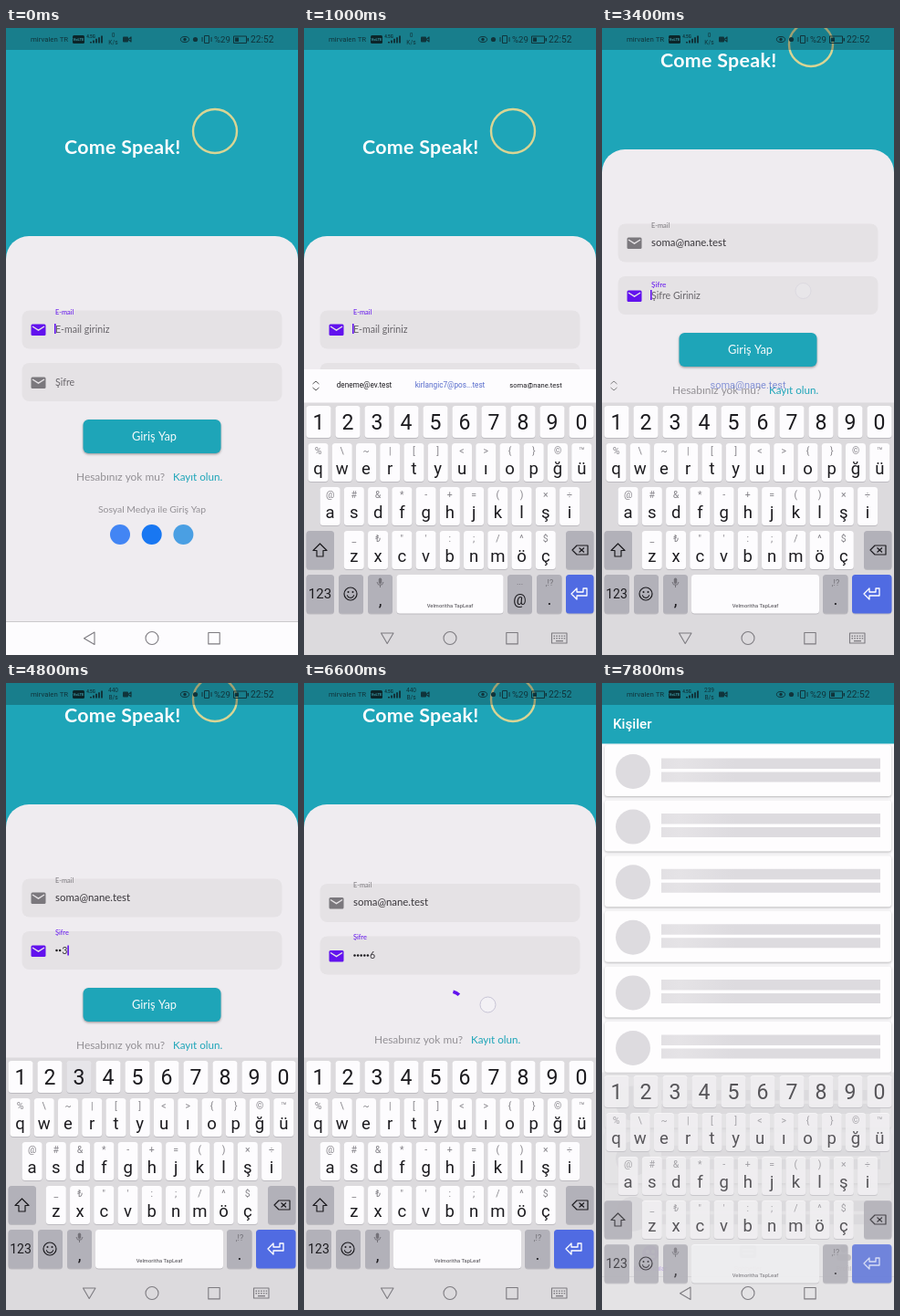
An HTML page with a canvas that plays this animation: 320x687 px, repeating every 8 s.

```html
<!DOCTYPE html>
<html lang="tr">
<head>
<meta charset="utf-8">
<title>Giriş</title>
<style>
html, body { margin: 0; width: 100%; height: 100%; overflow: hidden; background: #efecf0; }
canvas { display: block; width: 320px; height: 687px; }
</style>
</head>
<body>
<canvas id="stage"></canvas>
<script>
const W = 320, H = 687, LOOP = 8000, STEP = 200;
const TEAL = '#1ea5b8', PURPLE = '#6212ee', PAGE = '#efecf0', FIELD = '#e5e2e5', GREY = '#7b787d', INK = '#1c1b1f';
const MAIL = 'soma@nane.test';
const LATO = 'Lato, sans-serif', ROBOTO = 'Roboto, sans-serif';
const cv = document.getElementById('stage'), c = cv.getContext('2d');
const dpr = window.devicePixelRatio || 1;
cv.width = W * dpr;
cv.height = H * dpr;

const clamp = v => Math.max(0, Math.min(1, v));
const ramp = (t, a, b) => clamp((t - a) / (b - a));
const ease = p => p < .5 ? 4 * p ** 3 : 1 - (2 - 2 * p) ** 3 / 2;
const easeOut = p => 1 - (1 - p) ** 3;

function text(s, x, y, size, color, { align = 'left', font = LATO, weight = 400, gap = 0 } = {}) {
  c.font = `${weight} ${size}px ${font}`;
  c.letterSpacing = gap + 'px';
  c.textAlign = align;
  c.textBaseline = 'middle';
  c.fillStyle = color;
  c.fillText(s, x, y);
  return c.measureText(s).width;
}
const mid = (s, x, y, size, color, weight = 400, font = ROBOTO) =>
  text(s, x, y, size, color, { align: 'center', font, weight });

function box(x, y, w, h, r, color) {
  c.fillStyle = color;
  c.beginPath();
  c.roundRect(x, y, w, h, r);
  c.fill();
}
function disc(x, y, r, color) {
  c.fillStyle = color;
  c.beginPath();
  c.arc(x, y, r, 0, 7);
  c.fill();
}
function ring(x, y, r, color, width = 1) {
  c.strokeStyle = color;
  c.lineWidth = width;
  c.beginPath();
  c.arc(x, y, r, 0, 7);
  c.stroke();
}
function line(points, color, width = 1, close = false) {
  c.strokeStyle = color;
  c.lineWidth = width;
  c.lineJoin = 'round';
  c.beginPath();
  for (let i = 0; i < points.length; i += 2) c.lineTo(points[i], points[i + 1]);
  if (close) c.closePath();
  c.stroke();
}
function layer(alpha, dy, draw) {
  if (alpha <= 0) return;
  c.save();
  c.globalAlpha *= alpha;
  c.translate(0, dy);
  draw();
  c.restore();
}
function shadow(color, blur, dy, draw) {
  c.save();
  c.shadowColor = color;
  c.shadowBlur = blur * dpr;
  c.shadowOffsetY = dy * dpr;
  draw();
  c.restore();
}

// Status bar
function statusBar(t) {
  box(0, 0, W, 24, 0, 'rgba(10,20,25,.27)');
  const ink = '#10343b';
  text('mirvalen TR', 27, 12.5, 7.8, ink, { font: ROBOTO });
  box(73, 8, 13, 9, 1.5, '#0c2529');
  mid('VoLTE', 79.5, 12.8, 4.2, '#3d96a2', 700);
  mid('4.5G', 93, 9.5, 4.6, ink, 700);
  for (let i = 0; i < 5; i++) box(92 + i * 3, 15 - i * 1.6, 2, 1.5 + i * 1.6, 0, ink);
  const [rate, unit] = t < 4600 ? ['0', 'K/s'] : t < 7000 ? ['440', 'B/s'] : ['239', 'B/s'];
  mid(rate, 117.5, 8.5, 6.6, ink);
  mid(unit, 117.5, 16.5, 6.6, ink);
  box(128, 9.5, 6, 6, 1, ink);
  line([134, 12.5, 137, 10, 137, 15, 134, 12.5], ink, 1.2);
  c.strokeStyle = ink;
  c.lineWidth = 1;
  c.beginPath();
  c.ellipse(196, 12.5, 4.6, 3, 0, 0, 7);
  c.stroke();
  disc(196, 12.5, 1.7, ink);
  disc(207.5, 12.5, 2.6, ink);
  c.strokeRect(217.5, 8.5, 5, 8);
  line([215, 10, 215, 15], ink);
  line([225, 10, 225, 15], ink);
  text('%29', 228, 12.8, 9.6, ink, { font: ROBOTO });
  c.strokeStyle = ink;
  c.strokeRect(249.5, 9, 14, 7.5);
  box(251, 10.5, 4, 4.5, 0, ink);
  box(264.5, 11, 1.5, 3.5, 0, ink);
  text('22:52', 268, 12.8, 10.2, ink, { font: ROBOTO });
}

// Login page
function envelope(x, y, color) {
  box(x - 8, y - 6, 16, 12.5, 1.5, color);
  line([x - 6.5, y - 3.5, x, y + .7, x + 6.5, y - 3.5], FIELD, 1.4);
}
function caret(x, y) { box(x, y - 5.5, 1.6, 11, 0, PURPLE); }

function emailField(t) {
  const active = t < 3200, filled = t >= 1800;
  box(17.5, 309.5, 285, 42, 8, FIELD);
  envelope(35.5, 330.5, active ? PURPLE : GREY);
  text('E-mail', 54, 311.5, 7.4, active ? PURPLE : GREY);
  if (!filled) {
    text('E-mail giriniz', 54, 330.5, 10.6, '#68656a');
    caret(53, 329.5);
    return;
  }
  const w = text(MAIL, 54, 330.5, 11.4, '#39363b');
  if (active) {
    box(54, 335.5, w, .8, 0, '#39363b');
    caret(54.5 + w, 329.5);
  }
}

const TYPED = [4100, 4400, 4700, 5100, 5400, 5700];
function passwordField(t) {
  const active = t >= 3200, n = TYPED.filter(a => t >= a).length;
  box(17.5, 367, 285, 42, 8, FIELD);
  envelope(35.5, 388.5, active ? PURPLE : GREY);
  if (!active) {
    text('Şifre', 54, 388.5, 10.6, '#68656a');
    return;
  }
  const up = ramp(t, 3200, 3520);
  text('Şifre', 54, 388.5 - 20 * up, 9.6 - 2.2 * up, PURPLE);
  if (!n) {
    text('Şifre Giriniz', 54, 388.5, 10.6, '#68656a');
    caret(53, 387.5);
    return;
  }
  const plain = t - TYPED[n - 1] < 1500, dots = plain ? n - 1 : n;
  for (let i = 0; i < dots; i++) disc(55.5 + i * 3.6, 388, 1.25, INK);
  let x = 54 + dots * 3.6;
  if (plain) x += text(n, x, 388.5, 10.6, '#39363b');
  if (t < 6400) caret(x, 388);
}

function spinner(t) {
  const dt = t - 6400, cyc = dt % 1333 / 1333, deg = Math.PI / 180;
  const head = 270 * ease(clamp(cyc * 2)), tail = 270 * ease(clamp(cyc * 2 - 1));
  const base = dt * .07 + 270 * Math.floor(dt / 1333) - 90;
  c.strokeStyle = PURPLE;
  c.lineWidth = 3.6;
  c.beginPath();
  c.arc(160, 447, 14.2, (base + tail) * deg, (base + head + 1) * deg);
  c.stroke();
}

function loginPage(t) {
  const busy = t >= 6400, squeeze = busy ? 5.5 : 0;
  const scroll = -95 * easeOut(ramp(t, 2620, 3100));
  box(0, 0, W, H, 0, TEAL);
  layer(1, scroll, () => {
    text('Come Speak!', 64, 131, 21.4, '#fbfcfd', { weight: 700, gap: .3 });
    ring(229, 113, 24, '#d9d594', 2.4);
    box(0, 228, W, 700, [25, 25, 0, 0], PAGE);
    layer(1, squeeze, () => { emailField(t); passwordField(t); });
    if (busy) spinner(t);
    else {
      shadow('rgba(0,0,0,.35)', 2.5, 1.2, () => box(84.5, 429, 151, 37, 6, TEAL));
      mid('Giriş Yap', 162.5, 448, 12.8, '#f4fafb', 400, LATO);
    }
    layer(1, -squeeze, () => {
      text('Hesabınız yok mu?', 77, 492, 11.9, '#939095');
      text('Kayıt olun.', 183, 492, 11.6, TEAL);
      mid('Sosyal Medya ile Giriş Yap', 160, 528, 10.4, '#939095', 400, LATO);
      ['#4285f4', '#1877f2', '#4a9fe3'].forEach((col, i) => disc(125 + i * 34.7, 555, 11, col));
    });
  });
}

// Contacts page
function contactsPage(t) {
  box(0, 0, W, H, 0, '#faf9fb');
  const x = 85 + (t - 7800) * .5;
  const glow = c.createLinearGradient(x - 60, 0, x + 60, 0);
  glow.addColorStop(0, '#dddbdf');
  glow.addColorStop(.5, '#e5e3e6');
  glow.addColorStop(1, '#dddbdf');
  for (let i = 0; i < 9; i++) {
    const y = 68 + i * 60.6;
    shadow('rgba(0,0,0,.28)', 2.5, 1, () => box(3, y, 314, 56, 3, '#fefdfe'));
    disc(34, y + 29, 19, '#dddbdf');
    box(65, y + 14.5, 240, 11.5, 0, glow);
    box(65, y + 29.5, 240, 11, 0, glow);
  }
  box(0, 24, W, 42.5, 0, TEAL);
  box(0, 0, W, 24, 0, TEAL);
  text('Kişiler', 12, 46, 15.2, '#fff', { font: ROBOTO, weight: 500 });
  box(0, 601, W, 50, 0, '#fdfcfe');
  disc(53, 625, 9, PURPLE);
  disc(50, 623, 2, '#fff');
  disc(56, 623, 2, '#fff');
  box(48, 627, 10, 3, 2, '#fff');
  box(151, 616, 18, 14, 2, GREY);
  line([154, 621, 166, 621], '#fff');
  line([154, 625, 166, 625], '#fff');
  disc(265, 620, 4, GREY);
  box(257, 626, 16, 7, 4, GREY);
  mid('Kullanıcılar', 53, 642, 7.6, PURPLE);
  mid('Sohbetler', 160, 642, 7.2, GREY);
  mid('Profil', 265, 642, 7.2, GREY);
}

// Keyboard
const ROWS = [
  [15.5, 455, 'qwertyuıopğü', '%\\~|[]<>{}©™'],
  [28.6, 503, 'asdfghjklşi', '@#&*-+=()×÷'],
  [54.8, 551, 'zxcvbnmöç', '_₺"\':;/^$']
];
const KEY = '#fdfcfe', MOD = '#b2b1b9';

function key(x, y, w, h, color = KEY) {
  box(x, y + 1, w, h, 3.5, '#bdbbc0');
  box(x, y, w, h, 3.5, color);
}
function returnIcon(x, y) {
  line([x + 8, y - 6, x + 8, y + 2, x - 3, y + 2, x - 3, y + 6, x - 9, y, x - 3, y - 6, x - 3, y - 2, x + 4, y - 2, x + 4, y - 6],
    '#fff', 1.3, true);
}
function suggestions(t) {
  const fade = 1 - ramp(t, 3200, 3600);
  if (t < 3200) box(0, 374, W, 37, 0, '#fdfcfe');
  layer(Math.sqrt(fade), 0, () => {
    line([9.5, 390, 13, 387, 16.5, 390], '#555');
    line([9.5, 394, 13, 397, 16.5, 394], '#555');
    if (t < 1800) {
      mid('deneme@ev.test', 66, 392, 8.2, INK);
      mid('kirlangic7@pos...test', 160, 392, 8.2, '#566bcb');
      mid(MAIL, 254, 392, 7.6, INK);
    } else mid(MAIL, 160, 392, 11, '#566bcb');
  });
}
function keyboard(t) {
  const wide = t >= 3200;
  box(0, 410.5, W, 320, 0, '#dcdadd');
  for (let i = 0; i < 10; i++) {
    const hit = TYPED[i];
    const press = hit && t >= hit ? 1 - ramp(t, hit, hit + 200) : 0;
    key(2.5 + i * 32, 414, 27, 35);
    if (press) box(2.5 + i * 32, 414, 27, 35, 3.5, `rgba(178,177,185,${press * .6})`);
    mid((i + 1) % 10, 16 + i * 32, 433, 23, INK);
  }
  for (const [x0, y, letters, signs] of ROWS) {
    [...letters].forEach((ch, i) => {
      const x = x0 + i * 26.25;
      key(x - 11, y, 22, 42);
      mid([...signs][i], x, y + 9, 10.5, '#858389');
      mid(ch, x, y + 29, 18.5, INK);
    });
  }
  key(2.5, 551, 30.5, 42, MOD);
  line([17.5, 565, 25, 572.5, 21, 572.5, 21, 579, 14, 579, 14, 572.5, 10, 572.5], INK, 1.2, true);
  key(287, 551, 30.5, 42, MOD);
  line([294, 572, 299, 567, 311, 567, 311, 577, 299, 577], INK, 1.2, true);
  line([301.5, 569.5, 307, 574.5], INK, 1.2);
  line([307, 569.5, 301.5, 574.5], INK, 1.2);

  const y = 599, h = 42.5, s = wide ? 3 : 0;
  key(2.5, y, 30.5 - s, h, MOD);
  mid('123', 17.5 - s / 2, 621, 15 - s / 3, INK);
  key(38 - s, y, 27, h, MOD);
  const fx = 51 - s;
  ring(fx, 620, 7, INK, 1.2);
  disc(fx - 2.5, 618, 1, INK);
  disc(fx + 2.5, 618, 1, INK);
  c.beginPath();
  c.arc(fx, 620.5, 3.8, .2, Math.PI - .2);
  c.stroke();
  key(70 - s, y, 27, h, MOD);
  const mx = 83.5 - s;
  box(mx - 1.7, 602.5, 3.4, 6.5, 2, '#747279');
  line([mx - 3.5, 607, mx - 2, 610, mx + 2, 610, mx + 3.5, 607], '#747279');
  line([mx, 610, mx, 613], '#747279');
  mid(',', mx, 627, 19, INK);
  key(wide ? 98 : 101.5, y, wide ? 140 : 117, h);
  mid('Velmoritha TapLeaf', wide ? 168 : 160, 633.5, 5.8, '#69676c', 500);
  if (!wide) {
    key(223, y, 27, h, MOD);
    mid('...', 236.5, 607, 9, '#747279');
    mid('@', 236.5, 627, 16, INK);
  }
  const dx = wide ? 242 : 255;
  key(dx, y, 27.5, h, MOD);
  mid(',!?', dx + 14, 608, 9, '#747279');
  mid('.', dx + 14, 626, 19, INK);
  key(wide ? 274 : 287, y, wide ? 43.5 : 30.5, h, '#506be2');
  returnIcon(wide ? 296 : 302, 620);
}

function navIcons(open) {
  const ink = '#7d7b80';
  line(open ? [84.5, 663, 98, 663, 91.2, 674.5] : [97, 662, 97, 675.5, 85.5, 668.7], ink, 1.1, true);
  ring(160, 668.5, 7, ink, 1.1);
  c.strokeRect(221.8, 662.5, 12.4, 12.4);
  if (!open) return;
  c.strokeRect(271.5, 663, 16.5, 11);
  for (let i = 0; i < 10; i++) box(273.5 + i % 5 * 2.8, 665.5 + Math.floor(i / 5) * 2.6, 1.5, 1.4, 0, ink);
  box(276, 671, 8, 1.3, 0, ink);
}

function touch(x, y, alpha) {
  layer(alpha, 0, () => {
    disc(x, y, 8.5, 'rgba(244,242,247,.8)');
    ring(x, y, 8.5, '#c3bfd2', 1);
  });
}

function draw(t) {
  c.setTransform(dpr, 0, 0, dpr, 0, 0);
  loginPage(t);
  const open = ramp(t, 7150, 7450);
  if (open) layer(open, 60 * (1 - easeOut(open)), () => contactsPage(t));
  statusBar(t);
  box(0, 650, W, 37, 0, '#fdfcfe');
  box(0, 650, W, 1, 0, '#cbc9cc');

  const rise = easeOut(ramp(t, 200, 640)), leave = ramp(t, 7700, 7950);
  layer(rise * (1 - leave * .7), 40 * (1 - rise + leave), () => {
    if (t < 3600) suggestions(t);
    keyboard(t);
  });
  navIcons(rise > .5 && !leave);

  if (t >= 2400 && t < 3100) touch(260, 323 - 100 * easeOut(ramp(t, 2600, 3100)), 1);
  if (t >= 3200 && t < 3600) touch(220.5, 288, t < 3400 ? .9 : .3);
  if (t >= 6400 && t < 6800) touch(201.5, 352.5, .9);
}

function frame() {
  draw(Math.floor(performance.now() % LOOP / STEP) * STEP);
  requestAnimationFrame(frame);
}
frame();
</script>
</body>
</html>
```
